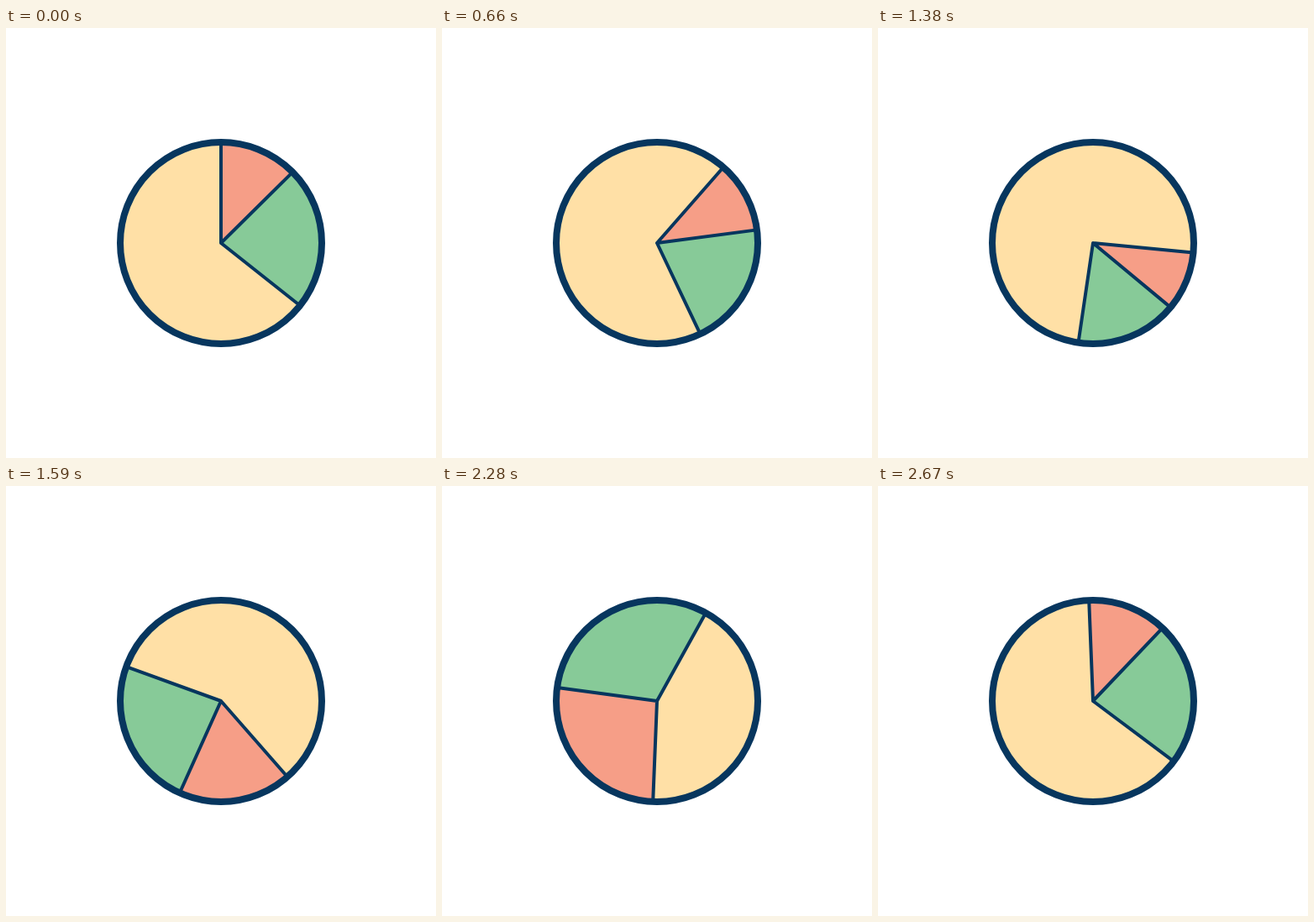
An HTML page with a canvas for the animation above (2700 ms loop, 512 by 512 pixels).

```html
<!DOCTYPE html>
<html lang="en">
<head>
<meta charset="utf-8">
<title>Turning pie chart</title>
<style>
html, body { margin: 0; width: 100%; height: 100%; overflow: hidden; background: #fff; }
canvas { display: block; width: 100vmin; height: 100vmin; }
</style>
</head>
<body>
<canvas id="stage" width="512" height="512"></canvas>
<script>
const ctx = document.getElementById('stage').getContext('2d');
const LOOP = 2700, STEP = 30, SEGMENT = 450;
const CENTER = 256, RADIUS = 120;
const NAVY = '#07365e', YELLOW = '#ffe0a6', RED = '#f69e87', GREEN = '#87ca98';
const RAD = Math.PI / 180;

// One pose per segment boundary: turn of the pie, then its three edges in degrees.
// sag bends the first edge on the way to the next pose.
const start = { turn: 0, edges: [0, 45.3, 128.4], sag: 0 };
const small = { turn: 90, edges: [4.6, 38, 96.5], sag: 0 };
const poses = [
  start,
  { ...start, sag: 5.5 },
  small,
  { ...small, sag: 11.2 },
  { turn: 180, edges: [0, 86.3, 191.9], sag: 0 },
  { turn: 180, edges: [0, 95.9, 207.4], sag: 0 },
  { ...start, turn: 360 }
];

const ease = t => t * t * (3 - 2 * t);
const mix = (a, b, k) => a + (b - a) * k;

// Angle of a point that travels straight between two points on the rim.
function chord(a, b, k) {
  const half = (b - a) / 2;
  return a + half + Math.atan(Math.tan(half * RAD) * (2 * k - 1)) / RAD;
}

function edgesAt(time) {
  const i = Math.floor(time / SEGMENT);
  const from = poses[i], to = poses[i + 1];
  const k = ease(time / SEGMENT - i);
  const turn = mix(from.turn, to.turn, k);
  return from.edges.map((angle, n) => {
    const local = n === 0
      ? mix(angle, to.edges[0], k) - from.sag * k * (1 - k)
      : chord(angle, to.edges[n], k);
    return (turn + local - 90) * RAD;
  });
}

function slice(from, to, color) {
  ctx.beginPath();
  ctx.moveTo(CENTER, CENTER);
  ctx.arc(CENTER, CENTER, RADIUS, from, to);
  ctx.closePath();
  ctx.fillStyle = color;
  ctx.fill();
}

function draw(time) {
  const [a, b, c] = edgesAt(time);
  ctx.fillStyle = '#fff';
  ctx.fillRect(0, 0, 512, 512);
  slice(0, 2 * Math.PI, YELLOW);
  slice(a, b, RED);
  slice(b, c, GREEN);

  ctx.strokeStyle = NAVY;
  ctx.lineCap = 'round';
  ctx.lineWidth = 4;
  ctx.beginPath();
  for (const angle of [a, b, c]) {
    ctx.moveTo(CENTER, CENTER);
    ctx.lineTo(CENTER + RADIUS * Math.cos(angle), CENTER + RADIUS * Math.sin(angle));
  }
  ctx.stroke();

  ctx.lineWidth = 8;
  ctx.beginPath();
  ctx.arc(CENTER, CENTER, RADIUS, 0, 2 * Math.PI);
  ctx.stroke();
}

function tick() {
  const time = performance.now() % LOOP;
  draw(Math.floor(time / STEP) * STEP);
  requestAnimationFrame(tick);
}
tick();
</script>
</body>
</html>
```
